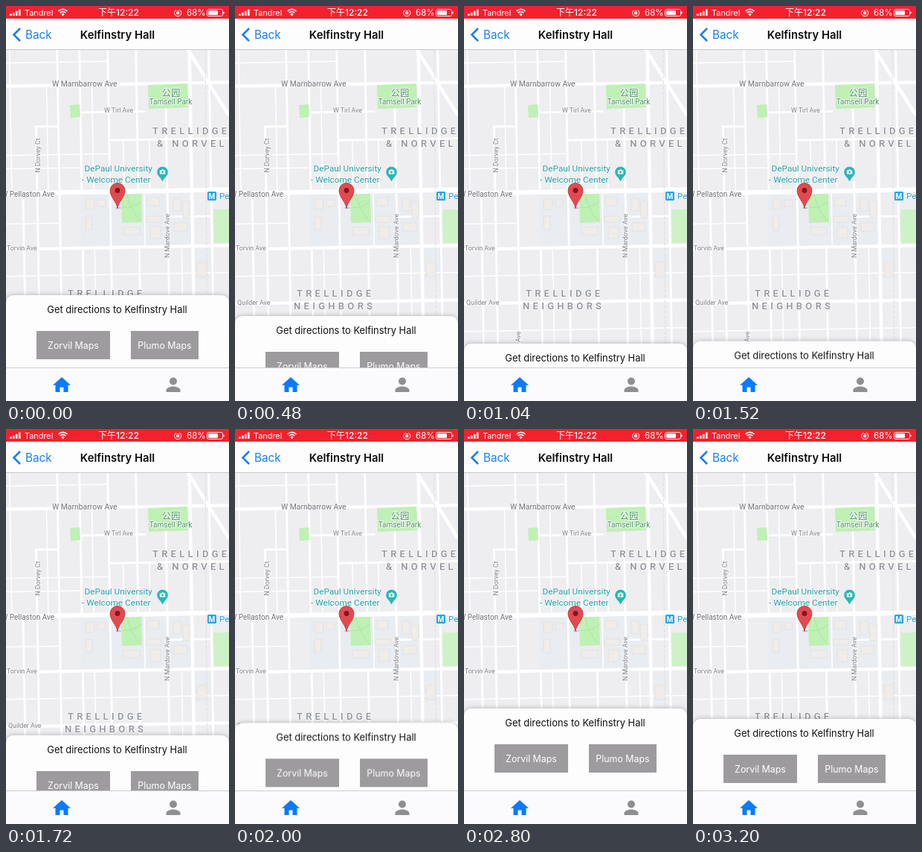
An HTML page for the animation above (3320 ms loop, 300 by 530 pixels).

```html
<!DOCTYPE html>
<html lang="en">
<head>
<meta charset="utf-8">
<title>Directions sheet</title>
<style>
html, body { margin: 0; width: 100%; height: 100%; overflow: hidden; background: #fff; }
svg { display: block; width: 100vw; height: 100vh; }
text { font-family: Inter, "Noto Sans CJK SC", "Noto Sans CJK", sans-serif; }
.mid { text-anchor: middle; }

.map text {
  font-family: Roboto, "Noto Sans CJK SC", "Noto Sans CJK", sans-serif;
  font-size: 8.8px; fill: #83858b;
  paint-order: stroke; stroke: #f8f7fa; stroke-width: 2px; stroke-linejoin: round;
}
.map .main { font-size: 10.4px; fill: #74767c; }
.map .area { font-size: 13px; font-weight: 500; letter-spacing: 4.3px; fill: #90949b; }
.map .park { font-size: 10px; fill: #459a5a; }
.map .poi { font-size: 11.8px; fill: #22a2a5; }
.map .metro { font-size: 11.5px; fill: #279fdc; }
.roads { fill: none; stroke: #fff; }

.sheet { animation: drag 3320ms infinite; filter: drop-shadow(0 0 3px rgba(0, 0, 0, .28)); }
.sheet text { font-size: 12.9px; fill: #111; }
.sheet .label { font-size: 12.4px; fill: #fff; }

/* Drag down, hold, spring back, pull up, settle: one step per 40 ms */
@keyframes drag {
  0%      { transform: translateY(388px); animation-timing-function: steps(6); }
  7.228%  { transform: translateY(400px); animation-timing-function: steps(6); }
  14.457% { transform: translateY(416px); animation-timing-function: steps(7); }
  22.891% { transform: translateY(436px); animation-timing-function: steps(7); }
  31.325% { transform: translateY(453px); animation-timing-function: steps(7); }
  39.759% { transform: translateY(456px); animation-timing-function: steps(1); }
  44.578% { transform: translateY(456px); animation-timing-function: steps(3); }
  48.192% { transform: translateY(437px); animation-timing-function: steps(3); }
  51.807% { transform: translateY(411px); animation-timing-function: steps(8); }
  61.445% { transform: translateY(392px); animation-timing-function: steps(9); }
  72.289% { transform: translateY(387px); animation-timing-function: steps(5); }
  78.313% { transform: translateY(380px); animation-timing-function: steps(5); }
  84.337% { transform: translateY(375px); animation-timing-function: steps(5); }
  90.361% { transform: translateY(380px); animation-timing-function: steps(5); }
  96.385% { transform: translateY(389px); animation-timing-function: steps(1); }
  100%    { transform: translateY(389px); }
}
</style>
</head>
<body>
<svg viewBox="0 0 300 530" preserveAspectRatio="none">
  <g class="map">
    <rect y="58" width="300" height="430" fill="#eeedf0"/>

    <!-- campus -->
    <path d="M101 253h39v70h-39zM143 252h74v69h-74zM221 250h29v70h-29zM252 320h24v46h-24z" fill="#e9ecf1"/>

    <g class="roads" transform="rotate(-1 150 250)">
      <path stroke-width="1.5" d="M-9 74H140M-9 198H140M-9 216H100M-9 290H70M-9 360H140M-9 434H140M140 360H310M140 434H310
        M8 40V250M57 105V250M118 105V250M118 325V500M159 180V250M194 180V250M235 325V500M186 250V325"/>
      <path stroke-width="2.8" d="M102 142H190M40 160H72M140 180H310M217 284H276
        M23 250V500M42 160V500M72 40V500M102 40V250M102 325V500M140 40V500M178 40V250M178 325V500M217 105V500M276 40V500"/>
      <path stroke-width="4.4" d="M-9 105H310M-9 324H310M-9 397H310M250 40V500"/>
      <path stroke-width="6.2" d="M-9 249H310"/>
    </g>
    <path class="roads" stroke-width="4.5" d="M243 56L300 147"/>
    <path d="M268 58L271 487" stroke="#dfdee3" stroke-width="1" stroke-dasharray="5 2"/>

    <!-- parks and buildings -->
    <path d="M191 106l53-2 1 32-53 2zM86 133l13-1 1 17-13 1zM155 253l27-1 1 38-27 1z" fill="#bff0b4"/>
    <path d="M279 273h21v45h-20z" fill="#cdf2c6"/>
    <path d="M156 270q13 3 26-8M163 252q3 20 18 37" fill="none" stroke="#aee6a5"/>
    <g fill="#f0ece9" stroke="#e0dddf" stroke-width=".7">
      <path d="M107 259h12v14h-12zM123 260h11v9h-11zM107 282h9v18h-9zM190 257h16v11h-16zM189 282h20v8h-20zM194 296h14v16h-14zM158 297h22v10h-22zM225 258h10v17h-10zM238 262h9v22h-9zM226 291h18v11h-18zM257 344h13v19h-13z"/>
    </g>

    <text class="main" x="62" y="108">W Marnbarrow Ave</text>
    <text x="132" y="143">W Tirl Ave</text>
    <text transform="translate(46 223.500) rotate(-90)">N Dorvey Ct</text>
    <text class="main" x="65" y="256" text-anchor="end" style="font-size:10px">W Pellaston Ave</text>
    <text x="1" y="328">Torvin Ave</text>
    <text transform="translate(220 338) rotate(-90)">N Mardove Ave</text>
    <text x="3" y="401">Quilder Ave</text>
    <text transform="translate(76 451) rotate(-90)">Ave</text>
    <text class="area" x="197" y="172">TRELLIDGE</text>
    <text class="area" x="203" y="189">&amp; NORVEL</text>
    <text class="area" x="83" y="390">TRELLIDGE</text>
    <text class="area" x="79" y="407">NEIGHBORS</text>
    <text class="park mid" x="222" y="120.500" style="font-size:12.500px">公园</text>
    <text class="park mid" x="221.500" y="132">Tamsell Park</text>
    <text class="poi" x="105.500" y="222">DePaul University</text>
    <text class="poi" x="102" y="237">- Welcome Center</text>

    <path d="M210.500 236Q207.500 230.500 205 228.300A7.700 7.700 0 1 1 216 228.300Q213.500 230.500 210.500 236Z" fill="#25b8b8" stroke="#fff" stroke-width=".6"/>
    <path d="M206.800 220.500h2l1-1.200h2l1 1.200h1.500v5h-7.500z" fill="#fff"/>
    <circle cx="210.500" cy="223" r="1.400" fill="#25b8b8"/>

    <rect x="271" y="249" width="12" height="12" rx="1.500" fill="#22a7e3"/>
    <text class="mid" x="277" y="258.800" style="font-size:10px;font-weight:700;fill:#fff;stroke:none">M</text>
    <text class="metro" x="287" y="259">Pe</text>

    <ellipse cx="151" cy="271" rx="4" ry="1.300" fill="#000" opacity=".15"/>
    <path d="M150 271.500C149 263 140 256.500 140 247.500A10 10 0 0 1 160 247.500C160 256.500 151 263 150 271.500Z" fill="#e24a50" stroke="#b93238" stroke-width=".8"/>
    <circle cx="150" cy="247.500" r="3.400" fill="#7c1a1c"/>
  </g>

  <g class="sheet">
    <rect width="300" height="170" rx="10" fill="#fefdfe"/>
    <text class="mid" x="149.500" y="24">Get directions to Kelfinstry Hall</text>
    <path d="M41 48h99v38H41zM168 48h91v38h-91z" fill="#9d9b9e"/>
    <text class="label mid" x="90.500" y="72">Zorvil Maps</text>
    <text class="label mid" x="213.500" y="72">Plumo Maps</text>
  </g>

  <!-- tab bar -->
  <rect y="485" width="300" height="45" fill="#fbfafc"/>
  <rect y="485" width="300" height="1" fill="#cdccd0"/>
  <path d="M75 498L63 508.800H66.500V518H72.500V511.500H77.500V518H83.500V508.800H87Z" fill="#0a7bff"/>
  <g fill="#8f8e93">
    <circle cx="225" cy="503.500" r="5"/>
    <path d="M215.500 518v-2.500c0-3.500 6-5 9.500-5s9.500 1.500 9.500 5v2.500z"/>
  </g>

  <!-- header -->
  <rect y="17" width="300" height="41" fill="#fefdfe"/>
  <rect y="58" width="300" height="1" fill="#c8c7cb"/>
  <path d="M19 30L10.500 38.500L19 47" fill="none" stroke="#1a80ee" stroke-width="2.600"/>
  <text x="26" y="43.800" font-size="15.300" fill="#1a80ee">Back</text>
  <text class="mid" x="150" y="43.500" font-size="14.800" font-weight="600" fill="#0c0c0c">Kelfinstry Hall</text>

  <!-- status bar -->
  <rect width="300" height="17" fill="#f1222e"/>
  <g fill="#fff">
    <path d="M5 10.500h2.600v2.500H5zM9 8.800h2.600V13H9zM13 6.800h2.600V13H13z"/>
    <path d="M17 4.500h2.600V13H17z"/>
    <text x="25" y="13" font-size="10.900">Tandrel</text>
    <text class="mid" x="151.500" y="13.200" font-size="12" font-weight="500">下午12:22</text>
    <text x="243" y="13.200" font-size="11.600">68%</text>
    <path d="M76.500 13.500l-2.200-2.600q2.200-1.600 4.400 0z"/>
    <rect x="229.200" y="8" width="4" height="3.300" rx=".5"/>
    <rect x="272" y="6" width="13" height="6" rx="1"/>
    <path d="M292.300 7.300q1.600.4 1.600 1.700t-1.600 1.700z"/>
  </g>
  <g fill="none" stroke="#fff">
    <path d="M72.600 9.200q3.900-3.200 7.800 0M70.500 6.800q6-4.800 12 0" stroke-width="1.600"/>
    <path d="M229 5.200A4.600 4.600 0 1 0 233.400 5.200" stroke-width="1"/>
    <path d="M230 8.200v-.8a1.200 1.200 0 0 1 2.400 0v.8" stroke-width=".8"/>
    <rect x="270.500" y="4.500" width="21" height="9" rx="2" stroke-width=".9"/>
  </g>
</svg>
</body>
</html>
```
